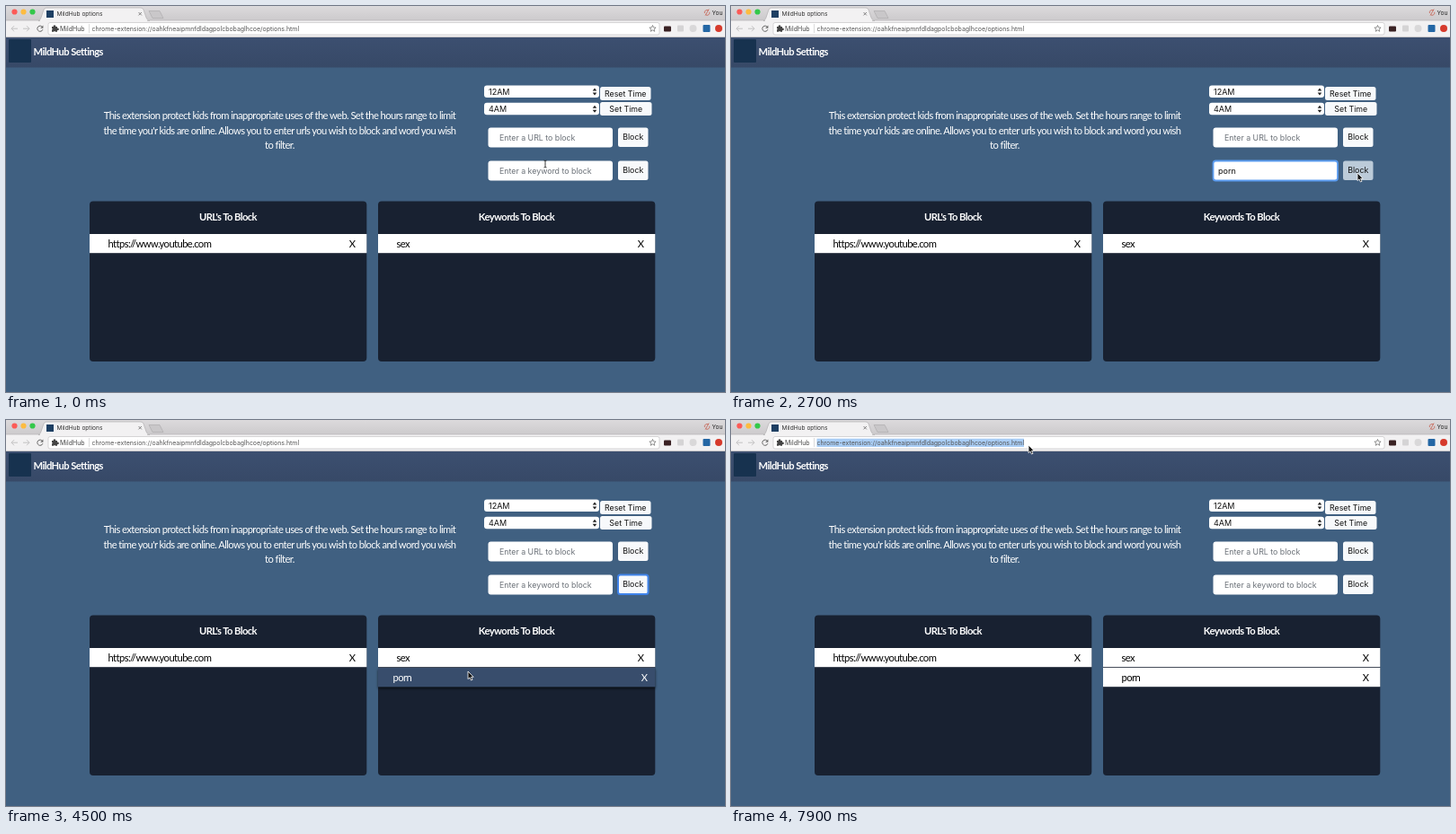
Recreate the animation shown at these times as an HTML page. Size 800 by 430 pixels, loop 8 s.

```html
<!DOCTYPE html>
<html lang="en">
<head>
<meta charset="utf-8">
<title>MildHub options</title>
<style>
  html, body { margin: 0; width: 100%; height: 100%; overflow: hidden; background: #406081; }
  svg { display: block; width: 800px; height: 430px; }
  text { white-space: pre; }
  .ui { font-family: Inter, sans-serif; }
  .page { font-family: Lato, sans-serif; font-size: 11.2px; letter-spacing: -.58px; }
  .bold { font-weight: 700; fill: #fff; }
  .mid { text-anchor: middle; }
</style>
</head>
<body>
<svg id="stage" viewBox="0 0 800 430">
  <defs>
    <linearGradient id="strip" x2="0" y2="1"><stop stop-color="#dcdadc"/><stop offset="1" stop-color="#cbc9cb"/></linearGradient>
    <linearGradient id="head" x2="0" y2="1"><stop stop-color="#3c4f70"/><stop offset="1" stop-color="#374967"/></linearGradient>
    <filter id="shade" x="-5%" y="-20%" width="110%" height="170%"><feDropShadow dx="0" dy="2" stdDeviation="1.5" flood-opacity=".65"/></filter>
  </defs>
  <g id="chrome"></g>
  <g id="page"></g>
  <g id="live"></g>
</svg>
<script>
const $ = id => document.getElementById(id);
const rect = (x, y, w, h, fill, r = 0, more = '') =>
  `<rect x="${x}" y="${y}" width="${w}" height="${h}" rx="${r}" fill="${fill}" ${more}/>`;
const dot = (x, y, r, fill) => `<circle cx="${x}" cy="${y}" r="${r}" fill="${fill}"/>`;
const line = (d, stroke, w = 1) => `<path d="${d}" fill="none" stroke="${stroke}" stroke-width="${w}"/>`;
const ui = (x, y, s, size, fill = '#111', cls = '') =>
  `<text class="ui ${cls}" x="${x}" y="${y}" font-size="${size}" fill="${fill}">${s}</text>`;
const label = (x, y, s, cls = '', fill = '#000') =>
  `<text class="page ${cls}" x="${x}" y="${y}" fill="${fill}">${s}</text>`;

const address = 'chrome-extension://oahkfneaipmnfdldagpolcbobaglhcoe/options.html';

$('chrome').innerHTML =
  rect(0, 0, 800, 17, 'url(#strip)') +
  dot(9.5, 6.5, 3.1, '#fc5b57') + dot(19.5, 6.5, 3.1, '#fdbc40') + dot(29.5, 6.5, 3.1, '#34c84a') +
  rect(0, 16, 800, 19, '#f2f1f2') + line('M0 16H37M160 16H800M0 34.5H800', '#b5b3b5', .7) +
  '<path d="M36 16.5Q38 16 39 13L42 4Q43 2 45 2H150Q152 2 153 4L156 13Q157 16 160 16.5Z" fill="#f2f1f2" stroke="#aaa8aa" stroke-width=".6"/>' +
  rect(38, 16, 119, 2, '#f2f1f2') +
  rect(45, 5, 8, 8, '#1d3f63') +
  ui(56.5, 11.2, 'MildHub options', 6.6, '#333') +
  line('M147.5 7l3.4 3.4m0-3.4l-3.4 3.4', '#666', .8) +
  '<path d="M159 5.5H171L175 13.5H163Z" fill="#c9c7c9" stroke="#aaa8aa" stroke-width=".6"/>' +
  line('M777.4 8a2.7 2.7 0 0 1 4-3.1m1.3 1.9a2.7 2.7 0 0 1-4 3.1m-.6.6l4-7', '#c65a4a', .8) +
  ui(785.5, 9.6, 'You', 6.6, '#222') +
  line('M13 25.2H6m3-3l-3 3l3 3', '#c3c2c3') +
  line('M19 25.2H26m-3-3l3 3l-3 3', '#c3c2c3') +
  line('M40.6 23.6a3.1 3.1 0 1 0 .3 2.6', '#666') + '<path d="M41.4 21.5v3.2h-3.2z" fill="#666"/>' +
  rect(47, 18.5, 680, 13.5, '#fff', 2, 'stroke="#c6c4c6" stroke-width=".7"') +
  '<path d="M51 23h1.8a1.3 1.3 0 1 1 2.4 0H57v1.7a1.3 1.3 0 1 1 0 2.3v1.8h-2a1.2 1.2 0 0 0-2 0h-2v-2a1.2 1.2 0 0 0 0-2z" fill="#444"/>' +
  ui(60, 27.8, 'MildHub', 7, '#444') + line('M92.5 20v10', '#ccc', .7) +
  '<path d="M719.5 21.5l1 2.4 2.6.2-2 1.7.6 2.5-2.2-1.4-2.2 1.4.6-2.5-2-1.7 2.6-.2z" fill="none" stroke="#666" stroke-width=".7"/>' +
  rect(732, 22.5, 8, 6, '#3a2224', 1) + rect(747, 21.5, 7, 7, '#d5d4d5', 1) +
  dot(764.5, 25, 4, '#d9d8d9') + rect(775.5, 21, 8, 8, '#2467a5', 1) + dot(793, 25, 4, '#d63a2c');

const button = (x, y, w, h, s, ty) =>
  rect(x, y, w, h, '#f7f9fb', 2.5) + ui(x + w / 2, ty, s, 8.8, '#111', 'mid');
const select = (y, s) =>
  rect(532, y, 128, 13.5, '#fff', 3) + ui(537, y + 10, s, 9) +
  `<path d="M652.7 ${y + 6}l2.3-3 2.3 3zm0 2l2.3 3 2.3-3z" fill="#222"/>`;
const panel = (x, title) =>
  rect(x, 217.5, 308.3, 178.5, '#182131', 4) + label(x + 154, 239, title, 'bold mid', '#fff');

$('page').innerHTML =
  rect(0, 35, 800, 395, '#406081') + rect(0, 35, 800, 33.5, 'url(#head)') +
  rect(3, 37, 25, 26, '#17324f', 1) + label(30.5, 55, 'MildHub Settings', 'bold', '#fff') +
  ['This extension protect kids from inappropriate uses of the web. Set the hours range to limit',
   "the time you'r kids are online. Allows you to enter urls you wish to block and word you wish",
   'to filter.'].map((s, i) => label(304.5, 126 + i * 16.5, s, 'mid', '#fff')).join('') +
  select(88.5, '12AM') + select(107.7, '4AM') +
  button(661, 90, 56.5, 15, 'Reset Time', 100.8) + button(661, 107, 57.5, 15, 'Set Time', 117.8) +
  rect(536.5, 135.5, 138.5, 22, '#fff', 3) + ui(549, 149.8, 'Enter a URL to block', 8.8, '#6b7178') +
  button(681, 135.5, 33.5, 21.5, 'Block', 149.3) +
  panel(93, "URL's To Block") + panel(414, 'Keywords To Block');

function row(x, y, s, hover) {
  const shift = hover ? 4 : 0, ink = hover ? '#fff' : '#000';
  return rect(x, y, 308.3, 21.2, hover ? '#384d6c' : '#fff', 0, hover ? 'filter="url(#shade)"' : '') +
    label(x + 20.5 - shift, y + 14.8, s, '', ink) + label(x + 292 + shift, y + 14.8, 'X', 'mid', ink);
}

// Pointer stops: time, x, y
const path = [[0, 600, 176], [500, 598, 183], [1900, 600, 184], [2500, 697, 186], [2800, 697, 186],
  [3300, 698, 188], [3600, 698, 188], [4400, 514, 280], [4900, 514, 280], [5500, 488, 295],
  [6400, 488, 295], [7300, 318, 24], [7500, 318, 24], [7800, 331, 28], [8000, 331, 28]];

function pointerAt(t) {
  const i = path.findIndex(p => p[0] > t), [t0, x0, y0] = path[i - 1], [t1, x1, y1] = path[i];
  const u = (t - t0) / (t1 - t0), e = u * u * (3 - 2 * u);
  return [x0 + (x1 - x0) * e, y0 + (y1 - y0) * e];
}

function pointer(x, y, beam) {
  const shape = beam
    ? line('M-1.5-4Q0-4 0-3V3Q0 4-1.5 4M1.5-4Q0-4 0-3M0 3Q0 4 1.5 4', '#222', .9)
    : '<path d="M0 0V8.6L2 6.9 3.4 10 5 9.3 3.6 6.3H6.2Z" fill="#111" stroke="#fff" stroke-width=".8"/>';
  return `<g transform="translate(${x} ${y})">${shape}</g>`;
}

function draw(t) {
  const [x, y] = pointerAt(t);
  const inside = (l, top, w, h) => x >= l && x < l + w && y >= top && y < top + h;
  const typed = 'porn'.slice(0, [1300, 1400, 1600, 1800].filter(k => t >= k).length);
  const added = t >= 3400, selected = t >= 7500;
  const inField = t >= 400 && t < 3300, onButton = t >= 3300 && !selected;
  const overButton = inside(681, 172.5, 34, 22), pressed = t >= 3300 && t < 3500;
  const typing = t >= 1200 && t < 1900;
  const value = added ? '' : typed;
  const ring = 'stroke="#3f83ea" stroke-width="2"';

  let out = selected ? rect(95.5, 20.7, 230.5, 9.3, '#a9cdf5') : '';
  out += ui(95.5, 27.8, address, 6.96, '#555');
  out += rect(536.5, 172.5, 138.5, 22, '#fff', 3, inField ? 'stroke="#5b9cf0" stroke-width="1.8"' : '');
  out += value ? ui(542, 187, value, 9) : ui(549, 187, 'Enter a keyword to block', 8.8, '#6b7178');
  if (inField && t < 2500 && (typing || t % 1000 < 500))
    out += rect(542.3 + [0, 5.5, 11, 14.3, 19.8][typed.length], 178.5, .8, 10.5, '#222');
  out += rect(681, 172.5, 33.5, 21.5, pressed ? '#a3b2c8' : overButton ? '#bccbd9' : '#f7f9fb', 2.5, onButton ? ring : '');
  out += ui(697.75, 186.4, 'Block', 8.8, '#111', 'mid');
  out += row(93, 254, 'https://www.youtube.com', inside(93, 254, 308, 21.5));
  out += row(414, 254, 'sex', inside(414, 254, 308, 22));
  if (added) out += row(414, 276, 'porn', inside(414, 276, 308, 22));
  if (!typing)
    out += pointer(x, y, inside(536, 172, 139, 23) || inside(95, 18, 632, 9));
  $('live').innerHTML = out;
}

let shown = -1;
function tick() {
  const t = Math.floor(performance.now() % 8000 / 100) * 100;
  if (t !== shown) draw(shown = t);
  requestAnimationFrame(tick);
}
tick();
</script>
</body>
</html>
```
